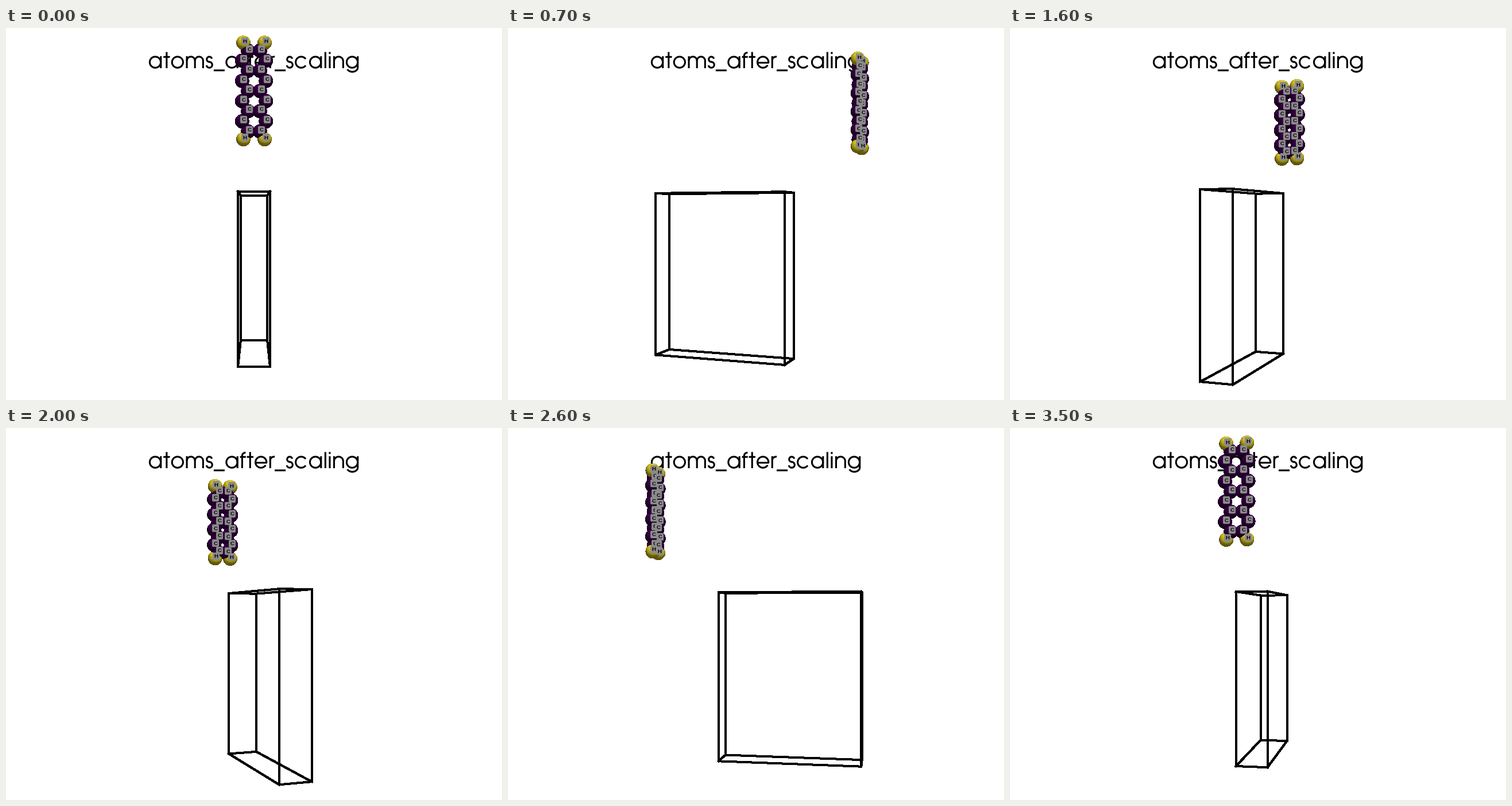
A matplotlib script that plays this animation: 864x648 px, repeating every 3600 ms.

```python
import numpy as np
import matplotlib.pyplot as plt
from matplotlib.animation import FuncAnimation
from matplotlib.collections import LineCollection
from matplotlib.patches import FancyBboxPatch

W, H, DPI = 864, 648, 100
FRAMES = 36
DIST = 1209.0            # camera distance; 1 unit is 1 px at the focal point
CX, CY = 432, 324
RADIUS = 12.5            # atoms keep their size on screen
SKY = 270                # rows of the atom layer

PURPLE = np.array([68, 1, 84]) / 255
YELLOW = np.array([253, 231, 37]) / 255


def px(n):
    return n * 72 / DPI


fig = plt.figure(figsize=(W / DPI, H / DPI), dpi=DPI, facecolor="white")
ax = fig.add_axes([0, 0, 1, 1])
ax.axis("off")


# ---- title: a monoline geometric alphabet, 1000 units per em ----
def arc(cx, cy, rx, a0, a1, ry=None):
    t = np.radians(np.linspace(a0, a1, 60))
    return np.column_stack([cx + rx * np.cos(t), cy + (ry or rx) * np.sin(t)])


def seg(*pts):
    return np.array(pts, float)


def stem(x, top, bottom=0):
    return seg((x, bottom), (x, top))


def arch(cx, r):
    return np.vstack([arc(cx, 526 - r, r, 180, 0), [(cx + r, 0)]])


GLYPHS = {
    "a": (683, [arc(330, 273, 252, 0, 360), stem(586, 547)]),
    "c": (647, [arc(325, 273, 252, 36, 324)]),
    "e": (650, [np.vstack([[(75, 250)], [(576, 250)], arc(325, 273, 252, 0, 328)])]),
    "f": (314, [np.vstack([[(118, 0)], arc(262, 565, 144, 180, 85)]),
                seg((18, 515), (285, 515))]),
    "g": (673, [arc(315, 273, 252, 0, 360),
                np.vstack([[(571, 547)], arc(323, 30, 248, 0, -155, 195)])]),
    "i": (200, [stem(100, 547), stem(100, 740, 650)]),
    "l": (200, [stem(100, 740)]),
    "m": (938, [stem(98, 547), arch(283.5, 185.5), arch(654.5, 185.5)]),
    "n": (610, [stem(98, 547), arch(306, 208)]),
    "o": (655, [arc(327, 273, 252, 0, 360)]),
    "r": (301, [stem(98, 547), arc(268, 350, 170, 180, 78, 174)]),
    "s": (388, [np.vstack([arc(188, 406, 118, 12, 270), arc(188, 154, 132, 90, -170)])]),
    "t": (339, [stem(168, 740), seg((20, 515), (318, 515))]),
    "_": (500, [seg((0, -100), (500, -100))]),
}


def draw_title(text, x, base, em):
    strokes = []
    for ch in text:
        width, parts = GLYPHS[ch]
        strokes += [np.column_stack([x + p[:, 0] * em / 1000,
                                     base - p[:, 1] * em / 1000]) for p in parts]
        x += width * em / 1000
    ax.add_collection(LineCollection(strokes, colors="black", linewidths=px(3.1),
                                     capstyle="butt", snap=False, zorder=1))


draw_title("atoms_after_scaling", 247.4, 70, 38.1)


# ---- scene ----
def project(p, deg):
    """Orbit about the vertical axis; return screen x, screen y, depth."""
    c, s = np.cos(np.radians(deg)), np.sin(np.radians(deg))
    x, y, z = np.asarray(p, float).T
    depth = DIST - (z * c - x * s)
    k = DIST / depth
    return CX + (x * c + z * s) * k, CY - y * k, depth


corners = np.array([(x, y, z) for x in (-26.6, 26.6)
                    for y in (-253, 37.3) for z in (-182, 60.5)])
edges = [(i, i | b) for i in range(8) for b in (1, 2, 4) if not i & b]

MID, STEP, PLANE = 181.9, 14.95, 182.5


def column(side, x, ks):
    return [("C", (side * x, MID + STEP * k, PLANE)) for k in ks]


def hydrogen(side, end):
    return [("H", (side * 15.7, MID + end * 71.4, PLANE))]


inner, outer = range(-4, 5, 2), range(-3, 4, 2)
atoms = (column(1, 8.85, inner) + hydrogen(1, 1) + column(-1, 8.85, inner)
         + column(-1, 17.6, outer) + column(1, 17.6, outer)
         + hydrogen(-1, 1) + hydrogen(-1, -1) + hydrogen(1, -1))
names = [a[0] for a in atoms]
places = np.array([a[1] for a in atoms])


def light(azim, elev, power):
    a, e = np.radians([azim, elev])
    return np.array([np.cos(e) * np.sin(a), np.sin(e), np.cos(e) * np.cos(a)]), power


LIGHTS = [light(10, 50, .75), light(0, -75, .25), light(0, 0, .25),
          light(110, 0, .21), light(-110, 0, .21)]


def render_atoms(xs, ys, depths):
    img = np.zeros((SKY, W, 4))
    zbuf = np.full((SKY, W), np.inf)
    for name, x, y, d in zip(names, xs, ys, depths):
        x0, y0 = int(x - 14), max(int(y - 14), 0)
        win = (slice(y0, y0 + 29), slice(x0, x0 + 29))
        h, w = zbuf[win].shape
        v, u = np.mgrid[y0:y0 + h, x0:x0 + w] + 0.5
        nx, ny = (u - x) / RADIUS, (y - v) / RADIUS
        rr = nx ** 2 + ny ** 2
        nz = np.sqrt(np.clip(1 - rr, 0, 1))
        z = d - nz * RADIUS * d / DIST
        hit = (rr <= 1) & (z < zbuf[win])
        shade = sum(p * np.clip(nx * l[0] + ny * l[1] + nz * l[2], 0, None)
                    for l, p in LIGHTS)
        rgb = np.clip(shade[..., None] * (YELLOW if name == "H" else PURPLE), 0, 1)
        img[win][hit] = np.dstack([rgb, np.ones((h, w))])[hit]
        zbuf[win][hit] = z[hit]
    return img


layer = ax.imshow(np.zeros((SKY, W, 4)), extent=(0, W, SKY, 0),
                  interpolation="nearest", aspect="auto", zorder=2)
# Without antialiasing every touched pixel is filled, so 3 px covers 4.
box = LineCollection([], colors="black", linewidths=px(3), capstyle="projecting",
                     antialiaseds=False, snap=False, zorder=3)
ax.add_collection(box)

tags = []
for i, name in enumerate(names):
    patch = FancyBboxPatch((0, 0), 12, 13, boxstyle="round,pad=0,rounding_size=2",
                           fc="#8a8a8a", ec="none", zorder=4 + i * .02)
    ax.add_patch(patch)
    text = ax.text(0, 0, name, family="Liberation Sans", weight="bold",
                   size=px(9.5), ha="center", va="baseline", zorder=4.01 + i * .02)
    tags.append((patch, text))

ax.set_xlim(0, W)
ax.set_ylim(H, 0)


def update(n):
    deg = 360 * n / FRAMES
    bx, by, _ = project(corners, deg)
    box.set_segments([[(bx[i], by[i]), (bx[j], by[j])] for i, j in edges])
    xs, ys, depths = project(places, deg)
    layer.set_data(render_atoms(xs, ys, depths))
    for (patch, text), x, y in zip(tags, np.round(xs - 3.7), np.round(ys - 9.5)):
        patch.set_x(x)
        patch.set_y(y)
        text.set_position((x + 6, y + 9.5))
    return [box, layer]


anim = FuncAnimation(fig, update, frames=FRAMES, interval=100, repeat=True,
                     repeat_delay=0, blit=False)
plt.show()
```
